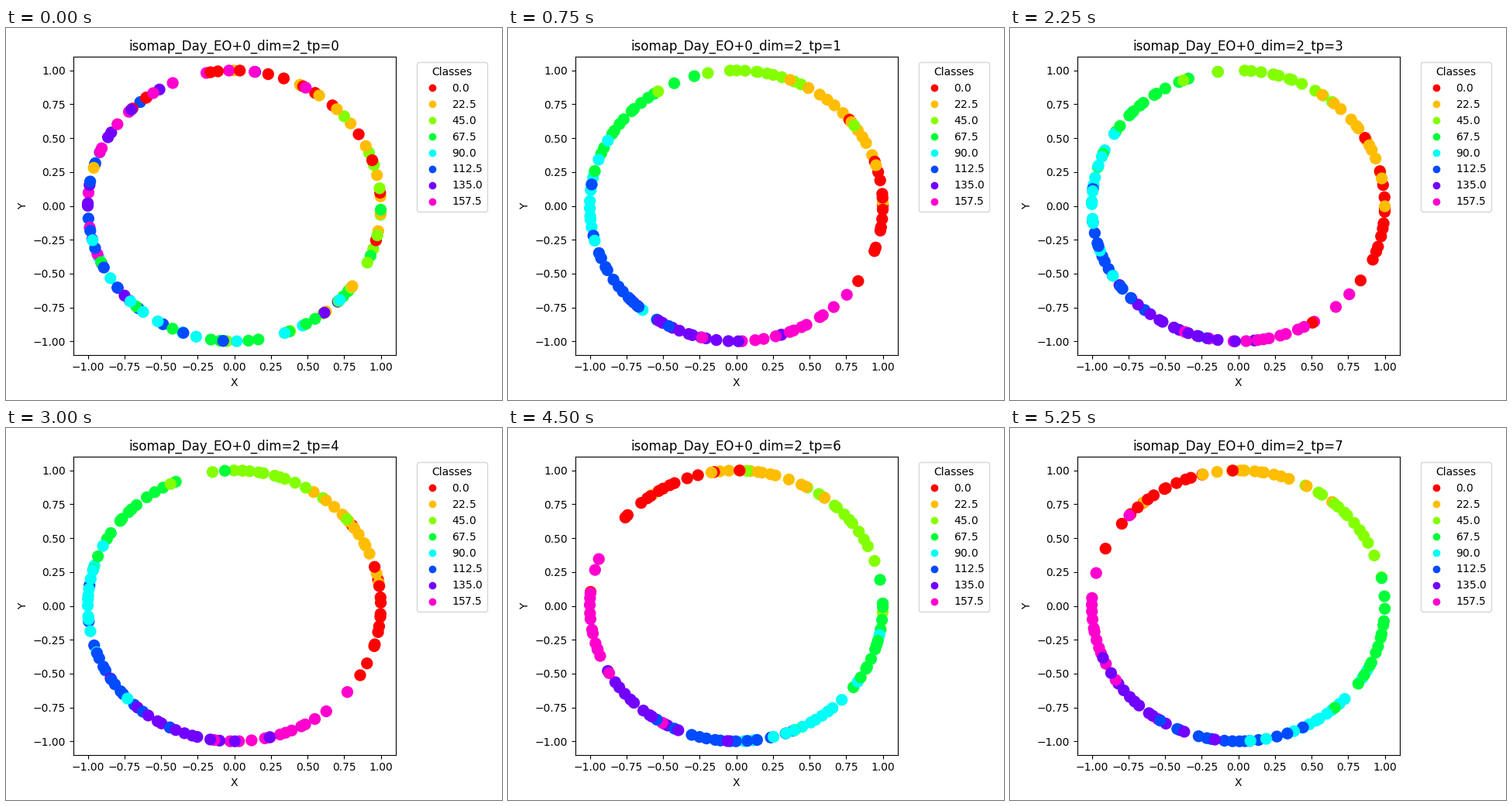
Recreate the animation shown at these times as a matplotlib script. Size 640 by 480 pixels, loop 6000 ms.

```python
import matplotlib.pyplot as plt
import numpy as np
from matplotlib.animation import FuncAnimation

STEP = 22.5     # degrees between class values
PER_CLASS = 14

# Where each class sits on the ring, relative to the first one.
RING = np.array([0, 40, 80, 139, 180, 215, 253, 293])

# Each time point turns the ring: angle of the first class, direction, scatter.
ROUNDS = [
    (65, -1, 26),
    (-1, 1, 10),
    (9, -1, 11),
    (-8, 1, 11),
    (-4, 1, 10),
    (119, -1, 10),
    (121, -1, 10),
    (123, -1, 10),
]


def points(tp):
    """Places on the unit circle and class values, in a mixed drawing order."""
    start, turn, scale = ROUNDS[tp]
    rng = np.random.default_rng(tp)
    kinds = np.repeat(np.arange(8), PER_CLASS)

    # One random draw per slice keeps a class evenly filled; the logistic
    # curve crowds its middle and lets a few points stray far out.
    slices = np.tile(np.arange(PER_CLASS), 8)
    u = (slices + rng.uniform(0.05, 0.95, kinds.size)) / PER_CLASS
    angles = np.radians(start + turn * RING[kinds] + scale * np.log(u / (1 - u)))

    order = rng.permutation(kinds.size)
    xy = np.column_stack([np.cos(angles), np.sin(angles)])
    return xy[order], kinds[order] * STEP


def heading(tp):
    return f"isomap_Day_EO+0_dim=2_tp={tp}"


fig, ax = plt.subplots(figsize=(6.4, 4.8), dpi=100)
xy, values = points(0)
dots = ax.scatter(xy[:, 0], xy[:, 1], c=values, s=100, cmap="hsv", vmin=0, vmax=180)
ax.set(xlim=(-1.1, 1.1), ylim=(-1.1, 1.1), xlabel="X", ylabel="Y")
title = ax.set_title(heading(0))
ax.legend(*dots.legend_elements(), title="Classes",
          loc="upper left", bbox_to_anchor=(1.05, 1))
fig.tight_layout()


def draw(tp):
    xy, values = points(tp)
    dots.set_offsets(xy)
    dots.set_array(values)
    title.set_text(heading(tp))
    return dots, title


anim = FuncAnimation(fig, draw, frames=len(ROUNDS), interval=750, repeat=True)
plt.show()
```
